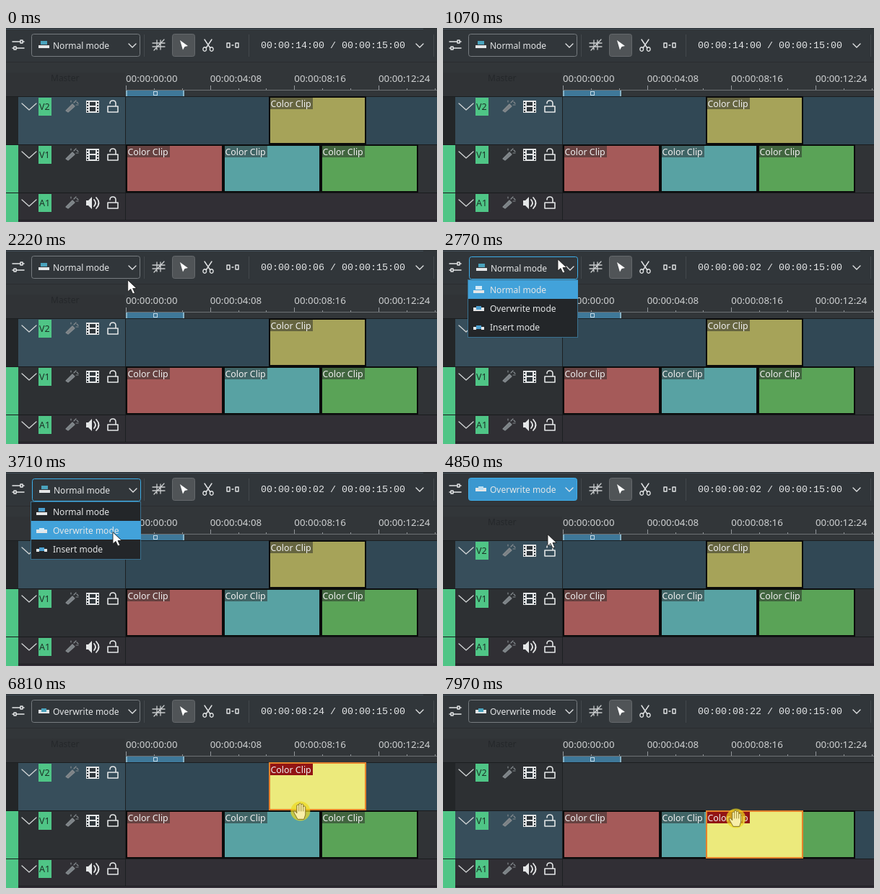
Write an HTML page with a canvas that moves like this. It is 597x270 px and loops after 8000 ms.

```html
<!DOCTYPE html>
<html lang="en">
<head>
<meta charset="utf-8">
<title>Timeline edit modes</title>
<style>
html, body { margin: 0; height: 100%; overflow: hidden; background: #303438; }
canvas { display: block; }
</style>
</head>
<body>
<canvas id="stage" width="597" height="270"></canvas>
<script>
const c = document.getElementById('stage').getContext('2d');
const LOOP = 8000, LEFT = 166, PX_PER_FRAME = 1.08, FPS = 25;
const OPEN = 2450, CHOOSE = 4100, GRAB = 5930;
const SANS = '"Noto Sans", "Open Sans", sans-serif';
const MONO = '"Liberation Mono", monospace';
const LIGHT = '#e4e6e7', GREEN = '#4fc586', BLUE = '#3daee9';

// Pointer path: time, x, y
const PATH = [
  [1260, 600, 285], [1740, 209, 145], [2080, 176, 66], [2350, 162, 20], [2500, 159, 13],
  [3030, 159, 13], [3550, 148, 84], [4580, 148, 84], [4850, 145, 87], [5120, 145, 87],
  [5800, 414.3, 127], [6000, 414.3, 127], [6810, 407.8, 163], [7250, 405.7, 173]
];

function pointer(t) {
  const i = PATH.findIndex(k => k[0] > t);
  if (i === 0) return PATH[0].slice(1);
  if (i < 0) return PATH[PATH.length - 1].slice(1);
  const [t0, x0, y0] = PATH[i - 1], [t1, x1, y1] = PATH[i];
  let u = (t - t0) / (t1 - t0);
  if (t > 3000) u = u * u * (3 - 2 * u);
  return [x0 + (x1 - x0) * u, y0 + (y1 - y0) * u];
}

function timecode(frames) {
  const pad = n => String(n).padStart(2, '0');
  return '00:00:' + pad(Math.floor(frames / FPS)) + ':' + pad(frames % FPS);
}

function box(x, y, w, h, fill) {
  c.fillStyle = fill;
  c.fillRect(x, y, w, h);
}

function panel(x, y, w, h, fill, edge) {
  c.beginPath();
  c.roundRect(x + .5, y + .5, w - 1, h - 1, 3);
  c.fillStyle = fill;
  c.fill();
  c.lineWidth = 1;
  c.strokeStyle = edge;
  c.stroke();
}

function text(s, x, y, fill = LIGHT, font = '12px ' + SANS) {
  c.font = font;
  c.fillStyle = fill;
  c.fillText(s, x, y);
}

function draw(d, x, y, stroke, width = 1.3, fill) {
  const p = new Path2D(d);
  c.save();
  c.translate(x, y);
  c.lineJoin = c.lineCap = 'round';
  if (fill) { c.fillStyle = fill; c.fill(p); }
  if (stroke) { c.strokeStyle = stroke; c.lineWidth = width; c.stroke(p); }
  c.restore();
}

function modeIcon(mode, x, y, accent) {
  if (mode === 'Normal') {
    box(x + 3, y, 9, 5, accent);
    box(x, y + 6, 15, 4, LIGHT);
  } else if (mode === 'Overwrite') {
    box(x, y + 4, 15, 5, LIGHT);
    box(x + 4, y + 2, 7, 5, accent);
  } else {
    box(x, y + 5, 4, 4, LIGHT);
    box(x + 11, y + 5, 4, 4, LIGHT);
    box(x + 4, y + 3, 7, 5, accent);
  }
}

function toolbar(mode, state, frames) {
  box(0, 0, 597, 47, '#31363a');
  box(0, 0, 597, 1, '#292d30');
  box(0, 1, 578, 1, '#43505a');
  box(0, 47, 597, 1, '#2a2d30');
  for (const x of [191, 336, 592]) box(x, 9, 1, 31, '#43484c');

  draw('M0 2H10M15 2H16M0 11H1M6 11H16M11 0H14V4H11ZM2 9H5V13H2Z', 9, 17, LIGHT, 1.5);

  // The pressed button sinks by one pixel
  const on = state === 'focus', down = state === 'open' ? 1 : 0;
  panel(35 + down, 8 + down, 151, 32, on ? '#3b98d0' : '#31363a', state ? BLUE : '#777c80');
  modeIcon(mode, 45 + down, 18 + down, on ? '#b9def3' : '#4aa3bd');
  text(mode + ' mode', 65 + down, 29 + down);
  draw('M0 0L5 5L10 0', 170 + down, 22 + down, LIGHT);

  draw('M0 5H17M0 10H17M6 1V14M11 1V14M2 15L16 0', 203, 16, '#c9cccd', 1.3);
  panel(230, 8, 32, 32, '#505457', '#65696c');
  draw('M0 0L11 8L6.5 9L4 13.5Z', 241, 17, null, 0, '#fff');
  draw('M2 0L10 12M12 0L4 12M4.5 13.5A2.3 2.3 0 1 1 0 13.5A2.3 2.3 0 1 1 4.5 13.5M14 13.5A2.3 2.3 0 1 1 9.5 13.5A2.3 2.3 0 1 1 14 13.5',
    273, 16, LIGHT, 1.4);
  draw('M0 0H4V6H0ZM12 0H16V6H12ZM7 3H9', 306, 21, LIGHT, 1.4);

  text(timecode(frames) + ' / 00:00:15:00', 353, 28, LIGHT, '13.33px ' + MONO);
  draw('M0 0L5 5L10 0', 568, 22, LIGHT);
}

function ruler() {
  box(0, 48, 597, 48, '#323639');
  box(0, 62, 165, 34, '#303336');
  text('Master', 62, 74, '#25282b');
  const step = 108 * PX_PER_FRAME;
  ['00:00', '04:08', '08:16', '12:24'].forEach((s, i) => {
    const x = LEFT + i * step;
    text('00:00:' + s, x, 75, '#d0d2d3', '13.3px ' + SANS);
    for (let k = 0; k < 3; k++) {
      const h = k ? 3 : 7;
      box(Math.round(x + k * step / 3), 87 - h, 1, h, '#92969a');
    }
  });
  box(LEFT, 86, 431, 1, '#6d7174');
  box(LEFT, 87, 81, 8, '#3f7899');
  for (const x of [166, 245]) box(x, 87, 2, 8, '#86b2c6');
  c.strokeStyle = '#c6d9e5';
  c.lineWidth = 1;
  c.strokeRect(204.5, 88.5, 5, 5);
  box(0, 95, 597, 1, '#1b1e20');
}

function track(name, y, h, active) {
  const audio = name[0] === 'A';
  box(17, y, 148, h, active ? '#374e5b' : audio ? '#302f34' : '#2d3033');
  box(LEFT, y, 431, h, active ? '#314855' : audio ? '#312f35' : '#303336');
  box(165, y, 1, h, '#1d2022');
  box(0, y + h, 597, 1, '#191b1d');
  box(0, y, 17, audio ? 270 - y : h, name === 'V2' ? '#232628' : GREEN);

  draw('M0 0L10 9L20 0', 22, y + 9, '#d2d5d6', 1.3);
  box(45, y + 1, 18, 25, GREEN);
  text(name, 46, y + 18, '#1c3328', '12.5px ' + SANS);
  draw('M1 15L10 6L13 9L4 17ZM12 4L15 1M15 7H18M8 3V1M16 3L18 5', 82, y + 4, '#858b8f', 1.2, '#7b8185');
  if (audio) {
    draw('M0 5H3L8 0V17L3 12H0Z', 111, y + 5, null, 0, LIGHT);
    draw('M0 4Q4 8.5 0 13M3 1Q10 8.5 3 16', 122, y + 5, LIGHT, 1.8);
  } else {
    box(111, y + 5, 18, 17, LIGHT);
    box(116, y + 7, 8, 5, '#30373c');
    box(116, y + 14, 8, 6, '#30373c');
    for (let i = 0; i < 4; i++)
      for (const x of [112, 126]) box(x, y + 7 + i * 4, 2, 2, '#30373c');
  }
  draw('M0 8H14V16H0ZM3 4Q3 0 7 0Q11 0 11 4V8', 141, y + 5, LIGHT, 1.6);
}

function clip(x, y, fill, selected) {
  box(x, y, 135, 67, selected ? '#e5812b' : '#0b0c0c');
  box(x + 2, y + 2, 131, 63, selected ? '#ecea7c' : fill);
  box(x + 2, y + 2, 59, 16, selected ? '#921414' : 'rgba(40,40,40,.5)');
  text('Color Clip', x + 2.5, y + 15, '#f0f0f0', '12.4px ' + SANS);
}

function menu(hot) {
  box(34, 41, 153, 81, '#3a718f');
  box(35, 42, 151, 79, '#232629');
  ['Normal', 'Overwrite', 'Insert'].forEach((mode, i) => {
    const y = 42 + 26 * i;
    if (i === hot) box(35, y, 152, 26, '#42a2da');
    modeIcon(mode, 42, y + 8, i === hot ? '#d5ebf7' : '#4a9fd0');
    text(mode + ' mode', 65, y + 18);
  });
}

function arrow(x, y) {
  draw('M0 0V16L4 12.5L7 19L9.8 17.8L7 11.5H12Z', x, y, '#222', .9, '#fff');
}

function hand(x, y, held) {
  if (held) {
    c.beginPath();
    c.arc(x, y, 13.5, 0, 7);
    c.fillStyle = 'rgba(238,216,30,.7)';
    c.fill();
  }
  draw('M-4 11L-9 2Q-10 -1 -7 0L-5 3V-8Q-3.5 -10 -2 -8V-10Q-.5 -12 1 -10V-9Q2.5 -11 4 -9V-6Q5.5 -8 7 -6V5L5 11Z',
    x, y, '#85742a', 1, '#f8eea8');
  draw('M-2 -8V0M1 -9V0M4 -7V0', x, y, '#a08d35', 1);
}

function render(t) {
  const [x, y] = pointer(t);
  // The position readout trails the pointer slightly
  const at = Math.round((pointer(t - 70)[0] - LEFT) / PX_PER_FRAME);
  const frames = Math.min(350, Math.max(2, at));
  const open = t >= OPEN && t < CHOOSE, held = t >= GRAB;
  const dropped = held && y > 165;
  const state = open ? 'open' : t >= CHOOSE && !held ? 'focus'
    : x < 187 && y < 40 ? 'hover' : '';

  toolbar(t < CHOOSE ? 'Normal' : 'Overwrite', state, frames);
  ruler();
  box(0, 268, 597, 2, '#353039');
  track('V2', 96, 66, !dropped);
  track('V1', 163, 66, dropped);
  track('A1', 230, 37, false);

  ['#a55a59', '#58a2a3', '#5aa357'].forEach((fill, i) => clip(LEFT + 135 * i, 162, fill));
  clip(364, dropped ? 162 : 95, '#a6a359', held);

  if (open) menu(y > 67 ? 1 : 0);
  if (t > 5120 && x > 366) hand(x, y, held);
  else arrow(x, y);
}

function tick(now) {
  render(now % LOOP);
  requestAnimationFrame(tick);
}
requestAnimationFrame(tick);
</script>
</body>
</html>
```
